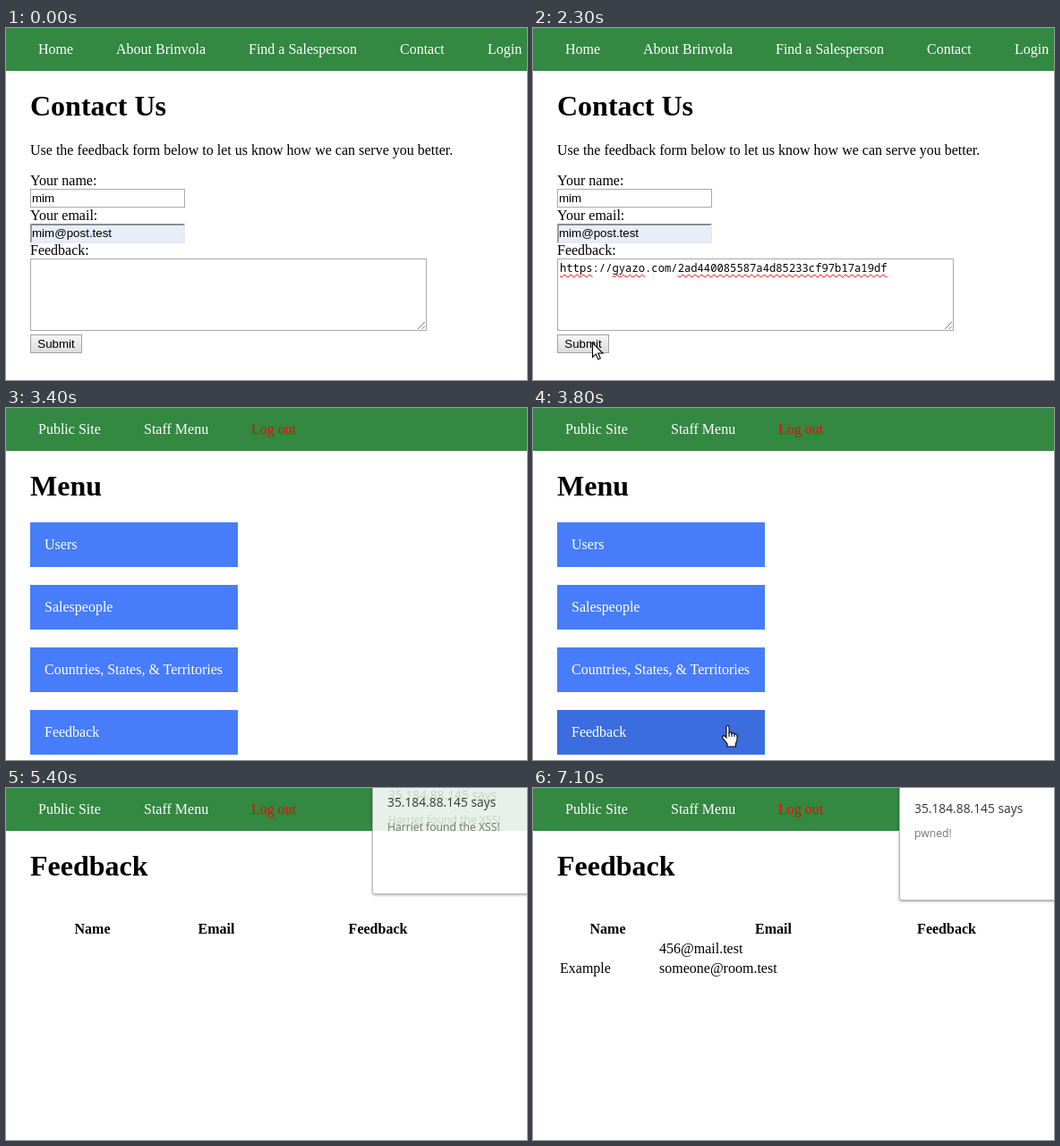
These frames come from a looping animation (582x394 px, 7.2 s). An HTML page:

```html
<!DOCTYPE html>
<html lang="en">
<head>
<meta charset="utf-8">
<title>Feedback form</title>
<style>
html, body { margin: 0; width: 100%; height: 100%; overflow: hidden; background: #fff; }
#stage {
  position: relative; width: 582px; height: 394px; overflow: hidden;
  font: 16px/18px "Liberation Serif", "Times New Roman", serif; color: #000; white-space: nowrap;
}
#stage div, #stage h1, #stage p, nav, nav span, table { position: absolute; margin: 0; }
#stage *, #stage { box-sizing: border-box; }

/* One 7.2 s loop, 72 ticks of 100 ms; small lead keeps cuts clear of tick edges */
.a { animation: 7.2s step-end -4ms infinite; }
.page { inset: 0; visibility: hidden; }
h1 { left: 27px; top: 69px; font: bold 32px/37px "Liberation Serif", "Times New Roman", serif; }
p { left: 27px; top: 128px; }

nav { left: 0; top: 0; width: 582px; height: 48px; background: #338842; color: #fff; }
nav span { top: 15px; }
nav .out { color: #f00; }

.label { left: 27px; }
.field {
  left: 27px; width: 173px; height: 21px; padding-left: 1px; background: #fff;
  border: 1px solid #a9a9a9; font: 13.333px/19px "Liberation Sans", Arial, sans-serif;
}
#stage .mail {
  height: 22px; padding-left: 0; background: #e8edf9; line-height: 18px;
  border: 2px solid; border-color: #8b8b90 #e6e9f2 #e6e9f2 #9a9aa0;
}
#area { left: 27px; top: 258px; width: 443px; height: 81px; border: 1px solid #a9a9a9; animation-name: focus; }
#grip { position: absolute; left: 459px; top: 328px; }
#url {
  left: 30px; top: 260px; font: 12.2px/18px "Noto Sans Mono", "DejaVu Sans Mono", monospace;
  opacity: 0; animation-name: paste;
}
#url u { text-decoration: underline wavy #f00 1px; text-underline-offset: 2px; text-decoration-skip-ink: none; }
#caret { left: 30px; top: 261px; width: 1px; height: 15px; background: #000; opacity: 0; animation-name: caret; }
#send {
  left: 27px; top: 343px; width: 58px; height: 21px; text-align: center;
  border: 1px solid #a3a3a3; background: linear-gradient(#f6f6f6, #dcdcdc);
  font: 13.333px/19px "Liberation Sans", Arial, sans-serif;
}

.item { left: 27px; width: 232px; height: 50px; padding: 16px; background: #477dfb; color: #fff; }
#hot { animation-name: hover; }

table { left: 27px; top: 146px; width: 500px; table-layout: fixed; border-spacing: 2px; visibility: hidden; }
th, td { padding: 1px; height: 20px; }
td { text-align: left; }

#box {
  left: 409px; top: -10px; width: 190px; height: 136px; background: #fff;
  border: 1px solid #b0b0b0; border-radius: 3px; box-shadow: 0 1px 3px rgba(0,0,0,.35);
  font-family: "Open Sans", "Noto Sans", sans-serif; opacity: 0; animation-name: box;
}
#box div { left: 16px; line-height: 20px; }
#box .host { top: 22px; font-size: 13.8px; color: #333; }
#box .msg { top: 50px; font-size: 12.2px; color: #757575; }
#first { animation-name: first; }
#rest { opacity: 0; animation-name: rest; }

#ptr { left: 0; top: 0; width: 0; height: 0; animation-name: move; }
#ptr svg { position: absolute; overflow: visible; }
#ptr g { fill: #fff; stroke: #000; stroke-width: 1.1; }
#beam, #hand { opacity: 0; }
#arrow { animation-name: arrow; }
#beam { animation-name: beam; }
#hand { animation-name: hand; }

@keyframes public { 0% { visibility: visible } 47.222% { visibility: hidden } }
@keyframes contact { 0% { visibility: visible } 34.722% { visibility: hidden } }
@keyframes thanks { 0% { visibility: hidden } 34.722% { visibility: visible } 47.222% { visibility: hidden } }
@keyframes staff { 0% { visibility: hidden } 47.222% { visibility: visible } }
@keyframes menu { 0% { visibility: hidden } 47.222% { visibility: visible } 54.167% { visibility: hidden } }
@keyframes list { 0% { visibility: hidden } 54.167% { visibility: visible } }
@keyframes rows0 { 0% { visibility: hidden } 54.167% { visibility: visible } 84.722% { visibility: hidden } }
@keyframes rows1 { 0% { visibility: hidden } 84.722% { visibility: visible } 93.056% { visibility: hidden } }
@keyframes rows2 { 0% { visibility: hidden } 93.056% { visibility: visible } }

@keyframes focus {
  0%, 30.556% { border-color: #a9a9a9; box-shadow: none }
  11.111% { border-color: #4f88d8; box-shadow: 0 0 1px 1px #a9c8f2 }
}
@keyframes paste { 0% { opacity: 0 } 16.667% { opacity: 1 } }
@keyframes caret {
  0% { opacity: 0; left: 30px }
  11.111% { opacity: 1; left: 30px }
  16.667% { opacity: 1; left: 397px }
  23.611% { opacity: 0; left: 397px }
}
@keyframes hover { 0%, 54.167% { background: #477dfb } 48.611% { background: #3b6ddf } }

@keyframes box {
  0% { opacity: 0; transform: none; text-shadow: none }
  55.556%, 77.778%, 86.111%, 94.444% { opacity: .6; transform: translateY(-10px); text-shadow: none }
  56.944%, 79.167%, 87.5%, 95.833% { opacity: 1; transform: none; text-shadow: none }
  75%, 81.944%, 90.278% { opacity: .89; transform: translateY(-7px); text-shadow: 1px -8px rgba(70,80,70,.2) }
  76.389%, 83.333%, 91.667% { opacity: .35; transform: translateY(-18px); text-shadow: none }
  84.722%, 93.056% { opacity: 0; transform: none; text-shadow: none }
}
@keyframes first { 0% { opacity: 1 } 77.778% { opacity: 0 } }
@keyframes rest { 0% { opacity: 0 } 77.778% { opacity: 1 } }

@keyframes move {
  0% { transform: translate(374px, 402px); animation-timing-function: steps(7) }
  9.722% { transform: translate(352px, 331px) }
  22.222% { transform: translate(352px, 331px); animation-timing-function: steps(6) }
  30.556% { transform: translate(66px, 352px) }
  33.333% { transform: translate(66px, 352px); animation-timing-function: steps(5) }
  40.278% { transform: translate(80px, 402px) }
  47.222% { transform: translate(240px, 402px); animation-timing-function: steps(3) }
  51.389% { transform: translate(217px, 355px) }
  58.333%, 100% { transform: translate(217px, 420px) }
}
@keyframes arrow {
  0%, 26.389%, 54.167% { opacity: 1 }
  8.333%, 48.611% { opacity: 0 }
}
@keyframes beam { 0%, 26.389% { opacity: 0 } 8.333% { opacity: 1 } }
@keyframes hand { 0%, 54.167% { opacity: 0 } 48.611% { opacity: 1 } }
</style>
</head>
<body>
<div id="stage">

  <div class="page a" style="animation-name:public">
    <nav>
      <span style="left:36px">Home</span>
      <span style="left:123px">About Brinvola</span>
      <span style="left:271px">Find a Salesperson</span>
      <span style="left:440px">Contact</span>
      <span style="left:538px">Login</span>
    </nav>
  </div>

  <div class="page a" style="animation-name:contact">
    <h1>Contact Us</h1>
    <p>Use the feedback form below to let us know how we can serve you better.</p>
    <div class="label" style="top:162px">Your name:</div>
    <div class="field" style="top:180px">mim</div>
    <div class="label" style="top:201px">Your email:</div>
    <div class="field mail" style="top:219px">mim@post.test</div>
    <div class="label" style="top:240px">Feedback:</div>
    <div id="area" class="a"></div>
    <svg id="grip" width="10" height="10" fill="none" stroke="#777"><path d="M1 9 9 1M5.5 9 9 5.5"/></svg>
    <div id="url" class="a"><u>https</u>://<u>gyazo</u>.com/<u>2ad440085587a4d85233cf97b17a19df</u></div>
    <div id="caret" class="a"></div>
    <div id="send">Submit</div>
  </div>

  <div class="page a" style="animation-name:thanks">
    <h1>Feedback Received</h1>
    <p>Thank you for submitting feedback. We hope to be able to use it to serve you<br>better.</p>
  </div>

  <div class="page a" style="animation-name:staff">
    <nav>
      <span style="left:36px">Public Site</span>
      <span style="left:154px">Staff Menu</span>
      <span style="left:274px" class="out">Log out</span>
    </nav>
  </div>

  <div class="page a" style="animation-name:menu">
    <h1>Menu</h1>
    <div class="item" style="top:128px">Users</div>
    <div class="item" style="top:198px">Salespeople</div>
    <div class="item" style="top:268px">Countries, States, &amp; Territories</div>
    <div id="hot" class="item a" style="top:338px">Feedback</div>
  </div>

  <div class="page a" style="animation-name:list">
    <h1>Feedback</h1>
    <table class="a" style="animation-name:rows0">
      <col width="135"><col width="138"><col width="219">
      <tr><th>Name</th><th>Email</th><th>Feedback</th></tr>
    </table>
    <table class="a" style="animation-name:rows1">
      <col width="95"><col width="243"><col width="154">
      <tr><th>Name</th><th>Email</th><th>Feedback</th></tr>
      <tr><td></td><td>456@mail.test</td><td></td></tr>
    </table>
    <table class="a" style="animation-name:rows2">
      <col width="109"><col width="257"><col width="126">
      <tr><th>Name</th><th>Email</th><th>Feedback</th></tr>
      <tr><td></td><td>456@mail.test</td><td></td></tr>
      <tr><td>Example</td><td>someone@room.test</td><td></td></tr>
    </table>
  </div>

  <div id="box" class="a">
    <div class="host">35.184.88.145 says</div>
    <div id="first" class="msg a">Harriet found the XSS!</div>
    <div id="rest" class="msg a">pwned!</div>
  </div>

  <div id="ptr" class="a">
    <svg width="1" height="1">
      <g id="arrow" class="a"><path d="M.5.5v16l3.7-3.6 2.5 6 2.6-1.1-2.5-5.8h5.2z"/></g>
      <g id="beam" class="a"><path fill="none" d="M-3.5-7H-1L0-6 1-7H3.5M0-6V6M-3.5 7H-1L0 6 1 7H3.5"/></g>
      <g id="hand" class="a">
        <path d="M-1 2C-1 0 2 0 2 2V8.500C3 7.500 5 8 5 9.300 6 8.500 8 9 8 10.300 9.500 9.500 11 10.500 11 12V16C11 18 9.500 19.500 9.500 21V24H0V21L-5 14.500C-6.500 12.500-4 11-2.500 12.500L-1 14Z"/>
        <path fill="none" d="M2 8.500V13M5 9.300V13M8 10.300V13"/>
      </g>
    </svg>
  </div>

</div>
</body>
</html>
```
